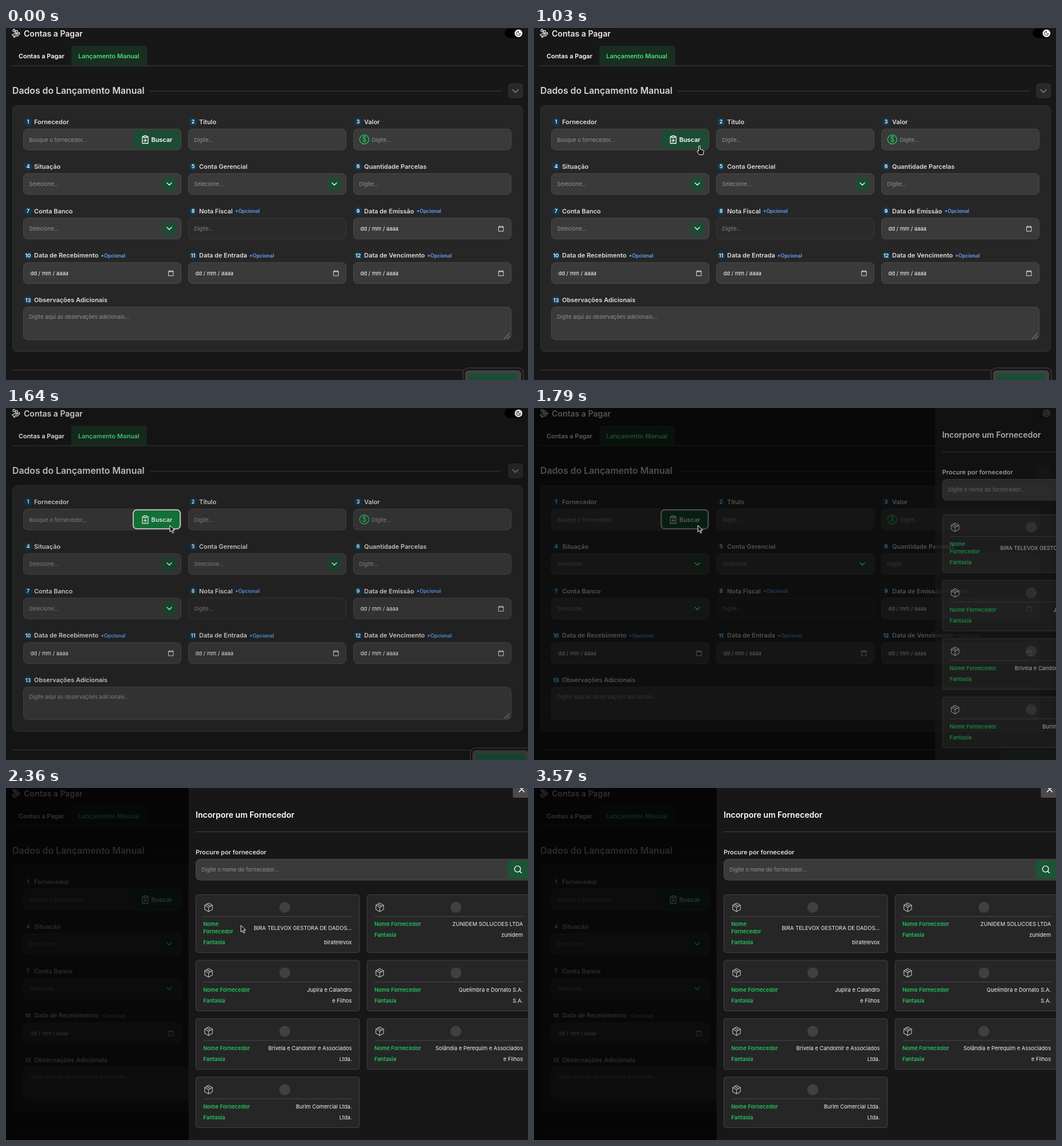
Animation, 911 px wide and 615 px high, one loop 3.99 s. Source, as an HTML page:

```html
<!DOCTYPE html>
<html lang="pt-BR">
<head>
<meta charset="utf-8">
<title>Contas a Pagar</title>
<style>
html, body { margin: 0; width: 100%; height: 100%; overflow: hidden; background: #171717; }
svg { display: block; }
text { font-family: Inter, "Open Sans", sans-serif; white-space: pre; }
</style>
</head>
<body>
<svg id="stage" width="911" height="615" viewBox="0 0 911 615"></svg>
<script>
const GREEN = '#1b4d32', BORDER = '#4b4b4b', MUTED = '#929292', LABEL = '#dedede';

const text = (x, y, s, size = 9.4, fill = '#fff', weight = 400, extra = '') =>
  `<text x="${x}" y="${y}" font-size="${size}" fill="${fill}" font-weight="${weight}" ${extra}>${s}</text>`;
const rect = (x, y, w, h, r, fill, stroke = 'none', extra = '') =>
  `<rect x="${x}" y="${y}" width="${w}" height="${h}" rx="${r}" fill="${fill}" stroke="${stroke}" ${extra}/>`;
const line = (x1, x2, y, color = '#404040') =>
  `<path d="M${x1} ${y}H${x2}" stroke="${color}"/>`;
const icon = (x, y, d, color = '#fff', width = 1.3) =>
  `<path transform="translate(${x} ${y})" d="${d}" fill="none" stroke="${color}" stroke-width="${width}" stroke-linecap="round" stroke-linejoin="round"/>`;
const disc = (x, y, r, fill, stroke = 'none') =>
  `<circle cx="${x}" cy="${y}" r="${r}" fill="${fill}" stroke="${stroke}" stroke-width="1.4"/>`;

const CHEVRON = 'M-4-2L0 2L4-2';
const CALENDAR = 'M-4-3.5H4V4.5H-4ZM-4-2.6H4M-2.3-5V-3.5M2.3-5V-3.5';
const BOX = 'M0-7.5L6.7-3.8V3.8L0 7.5L-6.7 3.8V-3.8ZM-6.7-3.8L0 0L6.7-3.8M0 0V7.5M-3.4-5.6L3.4-1.9';
const CLIPBOARD = 'M-2.5-5H-5V6.5H5V-5H2.5M-2.5-6.5H2.5V-3.5H-2.5ZM0-1V4M-2.5 1.5H2.5';
const HAND_COINS = 'M1 10L5 6.5H9Q10 8.5 7.5 9H6M8.5 8.5L12 5.5Q14.5 6 13 8L9.5 11.5H5L3 13.5M0 9L5 14'
  + 'M3.5 0A2 2 0 1 1 3.4 0M8 2A2 2 0 1 1 7.9 2';

const cols = [30.5, 318.5, 606.5];
const rows = [176.5, 254.3, 332.1, 409.9, 487.7];
const fields = [
  ['Fornecedor', 'search'], ['Título'], ['Valor', 'money'],
  ['Situação', 'select'], ['Conta Gerencial', 'select'], ['Quantidade Parcelas'],
  ['Conta Banco', 'select'], ['Nota Fiscal', 'off', 1], ['Data de Emissão', 'date', 1],
  ['Data de Recebimento', 'date', 1], ['Data de Entrada', 'date', 1], ['Data de Vencimento', 'date', 1],
  ['Observações Adicionais', 'area']
];

function field([name, kind, optional], i) {
  const x = cols[i % 3], y = rows[Math.floor(i / 3)], area = kind == 'area', off = kind == 'off';
  const hint = optional ? '<tspan dx="4" dy="-0.8" font-size="8.7" fill="#60a5fa">*Opcional</tspan>' : '';
  let s = disc(x + 8, y - 12.5, 7.3, '#13384e')
    + text(x + 8, y - 9.1, i + 1, 9.2, '#e4f2fa', 700, 'text-anchor="middle"')
    + text(x + 18.5, y - 8.6, name + hint, 10.92, LABEL, 600)
    + rect(x, y, area ? 851 : 275, area ? 57 : 36.5, 7, off ? '#2a2a2a' : '#3a3a3a', off ? '#3a3a3a' : BORDER);
  const hintText = { search: 'Busque o fornecedor...', select: 'Selecione...', area: 'Digite aqui as observações adicionais...' }[kind] || 'Digite...';
  if (kind == 'date') {
    s += text(x + 12, y + 22, 'dd / mm / aaaa') + icon(x + 257.5, y + 18.5, CALENDAR, '#ddd', 1);
  } else {
    s += text(x + (kind == 'money' ? 32 : 9.7), y + (area ? 19.8 : 22), hintText, 9.4, off ? '#808080' : MUTED);
  }
  if (kind == 'select') s += rect(x + 243.5, y + 7.2, 22, 22.3, 4, GREEN) + icon(x + 254.5, y + 18.2, CHEVRON);
  if (kind == 'money') s += disc(x + 18.7, y + 18.2, 8, 'none', '#22c55e')
    + text(x + 18.7, y + 22.6, '$', 12.5, '#22c55e', 500, 'text-anchor="middle"');
  if (area) s += icon(x + 839, y + 47, 'M0 8L9-1M5 8L9 4', '#aaa', 1);
  return s;
}

const page = icon(10.5, 2.5, HAND_COINS, '#e8e8e8', 1.3)
  + text(31, 14.8, 'Contas a Pagar', 14.04, '#e8e8e8', 600)
  + rect(870, 1, 33, 16.5, 8.2, '#000') + disc(894.5, 9.3, 6.8, '#fff')
  + icon(894.5, 9.3, 'M0-3.5A3.6 3.6 0 1 0 3.5.5A2.7 2.7 0 0 1 0-3.5', '#222', 1)
  + text(22, 52.8, 'Contas a Pagar', 10.92, '#fff', 600)
  + '<path d="M114 66V35Q114 31 118 31H242Q246 31 246 35V66Z" fill="#182e20"/>'
  + text(126, 52.8, 'Lançamento Manual', 10.92, '#4ade80', 600)
  + line(9, 903, 66)
  + text(11, 115.4, 'Dados do Lançamento Manual', 15.8, '#d6d6d6', 600)
  + line(251, 864, 110.3)
  + rect(877, 97.5, 24.5, 24.5, 4, '#292929', '#333') + icon(889, 110, 'M-5-2.4L0 2.6L5-2.4', '#999')
  + rect(11.5, 135.5, 890, 430, 8, '#262626', '#213a2e')
  + fields.map(field).join('')
  + rect(222.5, 178.5, 81, 32, 6, GREEN)
  + rect(222.5, 178.5, 81, 32, 6, '#15803d', 'none', 'id="hover"')
  + rect(222, 178, 82, 33, 6, 'none', '#fff', 'id="ring" stroke-width="1.6"')
  + icon(243, 195, CLIPBOARD) + text(253.5, 199.2, 'Buscar', 10.92, '#fff', 600)
  + line(11, 903, 597.7)
  + '<g id="fab">' + rect(797.5, 594, 105.5, 40, 9, '#171717', '#4a4a4a')
  + rect(801, 598, 98, 30, 6, '#404045') + rect(807, 603.5, 86, 30, 5, GREEN) + '</g>';

const suppliers = [
  ['BIRA TELEVOX GESTORA DE DADOS...', 'biratelevox'], ['ZUNIDEM SOLUCOES LTDA', 'zunidem'],
  ['Jupira e Calandro', 'e Filhos'], ['Quelimbra e Dornato S.A.', 'S.A.'],
  ['Brivela e Candomir e Associados', 'Ltda.'], ['Solândia e Perequim e Associados', 'e Filhos'],
  ['Burim Comercial Ltda.', 'Ltda.']
];
const cardTops = [186.5, 301, 403, 505];

function card([name, alias], i) {
  const x = 331.5 + i % 2 * 298.7, y = cardTops[i >> 1], wrap = i == 0;
  const key = (dy, s) => text(x + 12.7, y + dy, s, 9.4, '#22c55e', 600);
  const value = (dy, s) => text(x + 272, y + dy, s, 9.4, '#f2f2f2', 400, 'text-anchor="end"');
  const end = wrap ? 86 : 73.5;
  return rect(x, y, 285.5, i < 2 ? 101 : 88.5, 4, '#262626', '#424242')
    + icon(x + 22, y + 22, BOX, '#b5b5b5', 1.2) + disc(x + 155, y + 22, 9.6, '#404040')
    + line(x + 12.5, x + 272.5, y + 38, '#484848')
    + (wrap ? key(54.7, 'Nome') + key(67.2, 'Fornecedor') : key(54.7, 'Nome Fornecedor'))
    + value(wrap ? 61 : 54.7, name) + key(end, 'Fantasia') + value(end, alias);
}

const drawer = rect(318.5, -1, 620, 617, 0, '#171717')
  + rect(884.5, -12, 31, 29, 3, '#4a4a4a') + icon(900, 2.3, 'M-4.5-4.5L4.5 4.5M4.5-4.5L-4.5 4.5', '#fff', 1.5)
  + text(331, 52, 'Incorpore um Fornecedor', 14.04, '#fff', 600) + line(331, 916, 76.5, '#484848')
  + text(331, 115.8, 'Procure por fornecedor', 10.92, LABEL, 600)
  + rect(331.5, 124.5, 584.5, 36.5, 7, '#3a3a3a', BORDER)
  + text(341, 146.2, 'Digite o nome do fornecedor...', 9.4, MUTED)
  + rect(875.5, 126.5, 38, 32, 6, '#1b5535') + icon(893, 142, 'M5-.5A5.3 5.3 0 1 1-5.6-.5A5.3 5.3 0 1 1 5-.5M3.5 3.3L6.7 6.5')
  + suppliers.map(card).join('');

const outline = 'fill="#111" stroke="#fff" stroke-width="1" stroke-linejoin="round"';
const cursor = `<path id="arrow" d="M0 0V11.5L2.7 9L4.7 13.6L6.7 12.7L4.7 8.3H8.3Z" ${outline}/>`
  + `<path id="hand" d="M-1.5 9V1Q-1.5-.3-.2-.3Q1 -.3 1 1V6L6.5 7.5Q7.5 8 7.2 10L6 15.5H-.3L-4 10.5Q-4.5 9-3 8.6Z" ${outline}/>`;

const stage = document.getElementById('stage');
stage.innerHTML = rect(0, 0, 911, 615, 0, '#171717') + page + '<rect id="shade" width="911" height="615"/>'
  + `<g id="drawer">${drawer}</g><g id="cursor">${cursor}</g>`;
const el = id => document.getElementById(id);
const set = (id, name, value) => el(id).setAttribute(name, value);
const show = (id, on) => set(id, 'visibility', on ? 'visible' : 'hidden');
const ramp = (t, from, span) => Math.max(0, Math.min(1, (t - from) / span));

// Pointer path: time, x, y
const path = [
  [260, 810, 603], [740, 327, 256], [810, 325, 253], [880, 306, 228], [950, 294, 212],
  [1017, 289, 206], [1290, 286, 205], [2290, 286, 205], [2360, 410, 240], [2498, 640, 300],
  [2567, 671, 350], [2636, 640, 419], [2774, 470, 340], [2850, 424, 296], [3430, 804, 598], [3500, 850, 603]
];
// The picture advances in short steps from each of these moments
const starts = [0, 260, 810, 1360, 1500, 2360, 2920, 3500];
const STEP = 69, LOOP = 3990;

function pointAt(t) {
  const i = path.findIndex(p => p[0] > t);
  if (i < 1) return i ? path[path.length - 1].slice(1) : path[0].slice(1);
  const [a, b] = [path[i - 1], path[i]], u = (t - a[0]) / (b[0] - a[0]);
  return [a[1] + (b[1] - a[1]) * u, a[2] + (b[2] - a[2]) * u];
}

function draw(time) {
  const start = starts.filter(s => s <= time).pop();
  const t = start + Math.floor((time - start) / STEP) * STEP;

  const [x, y] = pointAt(t);
  const hand = t > 700 && t < 850 || t > 1000 && t < 1500;
  set('cursor', 'transform', `translate(${x} ${y})`);
  const visible = t >= 260 && t < 3560;
  show('arrow', visible && !hand);
  show('hand', visible && hand);

  set('hover', 'opacity', ramp(t, 1030, 200) * (1 - ramp(t, 1638, 160)));
  show('ring', t >= 1360 && t < 1800);
  set('fab', 'transform', `translate(${t >= 1500 ? 13 : 0} 0)`);

  set('shade', 'opacity', 0.8 * ramp(t, 1600, 220));
  const u = ramp(t, 1665, 267);
  set('drawer', 'transform', `translate(${610 * (1 - u * u * (3 - 2 * u))} 0)`);
  set('drawer', 'opacity', ramp(t, 1638, 210));
}

const origin = performance.now();
function tick() {
  draw((performance.now() - origin) % LOOP);
  requestAnimationFrame(tick);
}
tick();
</script>
</body>
</html>
```
